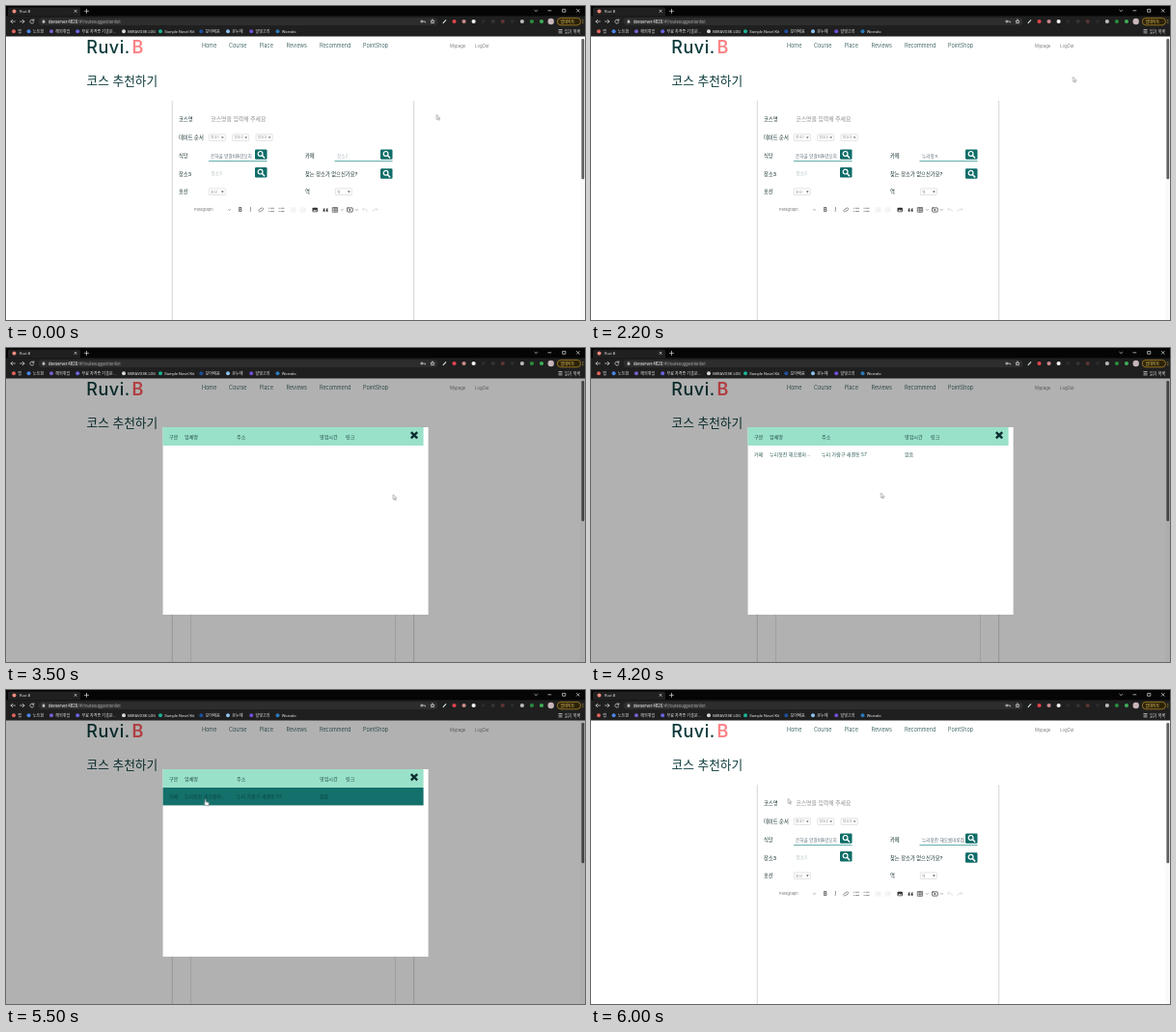
Animation, 600 px wide and 325 px high, one loop 6500 ms. Source, as an HTML page:

```html
<!DOCTYPE html>
<html lang="ko">
<head>
<meta charset="utf-8">
<title>코스 추천하기</title>
<style>
  html, body { margin: 0; width: 100%; height: 100%; overflow: hidden; background: #fff; }
  svg { display: block; width: 100%; height: 100%; }
  text { font-family: Inter, 'Noto Sans CJK KR', 'Noto Sans CJK', 'Noto Sans CJK JP', sans-serif; white-space: pre; }
  .chrome text { font-family: Roboto, 'Noto Sans CJK KR', 'Noto Sans CJK', 'Noto Sans CJK JP', sans-serif; }
  .line { fill: none; stroke-linecap: round; stroke-linejoin: round; }
  .ink { fill: #0d3b3c; }

  .cursor, .arrow, .hand, .modal, .result, .hover, .rowText, .accent, .frame {
    animation: 6500ms infinite step-end;
  }
  .cursor { animation-name: travel; animation-timing-function: ease-in-out; }
  .arrow { animation-name: arrow; }
  .hand { animation-name: hand; }
  .modal { animation-name: modal; }
  .result { animation-name: result; }
  .hover { animation-name: hover; }
  .rowText { fill: #2d5f58; animation-name: rowText; }
  .accent { fill: #fb8488; animation-name: accent; }
  .frame { stroke: #fff; animation-name: frame; }

  @keyframes travel {
    0% { transform: translate(446.2px, 112.4px); }
    12.3% { transform: translate(463.2px, 114.8px); }
    27.7%, 33.8% { transform: translate(499.5px, 73.4px); }
    44.6%, 53.8% { transform: translate(401.2px, 151.8px); }
    64.6%, 66.1% { transform: translate(300.5px, 150.1px); }
    75.4%, 86.1% { transform: translate(206.2px, 112.6px); }
    87.7%, 100% { transform: translate(204.3px, 112.4px); }
  }
  @keyframes arrow {
    0%, 53.8%, 86.1% { opacity: 1; }
    44%, 73.8% { opacity: 0; }
  }
  @keyframes hand {
    0%, 53.8%, 86.1% { opacity: 0; }
    44%, 73.8% { opacity: 1; }
  }
  @keyframes modal { 0%, 86.1% { opacity: 0; } 53.8% { opacity: 1; } }
  @keyframes result { 0% { opacity: 0; } 55.3% { opacity: 1; } }
  @keyframes hover { 0%, 86.1% { opacity: 0; } 73.8% { opacity: 1; } }
  @keyframes rowText { 0%, 86.1% { fill: #2d5f58; } 73.8% { fill: #0a4644; } }
  @keyframes accent { 0%, 86.1% { fill: #fb8488; } 53.8% { fill: #ff5a5e; } }
  @keyframes frame { 0%, 86.1% { stroke: #fff; } 53.8% { stroke: #dcdce4; } }
</style>
</head>
<body>
<svg viewBox="0 0 600 325" preserveAspectRatio="none">
  <defs>
    <g id="search">
      <rect width="12.5" height="10.4" rx="1.2" fill="#0f6d68"/>
      <circle cx="5.6" cy="4.5" r="2.4" fill="none" stroke="#fff" stroke-width="1.2"/>
      <path d="M7.5 6.4L9.7 8.6" stroke="#fff" stroke-width="1.5" stroke-linecap="round"/>
    </g>
    <g id="select">
      <rect x=".3" y=".3" width="17" height="6.6" rx=".6" fill="#fff" stroke="#c6c6c6" stroke-width=".5"/>
      <path d="M13 2.9h2.6L14.3 4.6z" fill="#444"/>
    </g>
    <path id="chevron" class="line" d="M-1-.5L0 .5L1-.5" stroke="#555" stroke-width=".5"/>
    <g id="bullets" class="line" stroke="#555" stroke-width=".6">
      <path d="M-.6-1.7H2.6M-.6 1.5H2.6M-2.6-1.7h.5M-2.6 1.5h.5"/>
    </g>
    <g id="indent" class="line" stroke="#ddd" stroke-width=".5">
      <path d="M-2.5-2h5M0-.6h2.5M0 .7h2.5M-2.5 2h5M-2.4-.7l1.2.8l-1.2.8"/>
    </g>
    <path id="undo" class="line" d="M-2.4-.6H.8Q2.4-.4 2.3 1.5M-1-2L-2.4-.6L-1 .8" stroke="#d2d2d2" stroke-width=".6"/>
  </defs>

  <rect width="600" height="325" fill="#fff"/>

  <!-- page header -->
  <text class="ink" x="83.3" y="48.6" font-size="18" font-weight="500" letter-spacing=".5">Ruvi.</text>
  <text class="accent" x="130.6" y="48.6" font-size="18" font-weight="600">B</text>
  <g class="ink" font-size="5.5" font-weight="300">
    <text x="203" y="43.4">Home</text>
    <text x="231" y="43.4">Course</text>
    <text x="262.8" y="43.4">Place</text>
    <text x="290.6" y="43.4">Reviews</text>
    <text x="325" y="43.4">Recommend</text>
    <text x="370" y="43.4">PointShop</text>
  </g>
  <g fill="#555" font-size="4.3" font-weight="300">
    <text x="460" y="43.2">Mypage</text>
    <text x="486" y="43.2">LogOut</text>
  </g>
  <text class="ink" x="83.6" y="82.3" font-size="12.7">코스 추천하기</text>

  <!-- form -->
  <path d="M172.3 98V325M422.6 98V325" stroke="#dcdce0" stroke-width="1.2"/>
  <path class="frame" d="M191.6 219V325M403.4 219V325" stroke-width=".8"/>
  <g fill="#173132" font-size="5.3" font-weight="500">
    <text x="179" y="119.2">코스명</text>
    <text x="179" y="138">데이트 순서</text>
    <text x="179" y="156.8">식당</text>
    <text x="179" y="175.6">장소3</text>
    <text x="179" y="194.2">호선</text>
    <text x="310" y="156.8">카페</text>
    <text x="310" y="175.6">찾는 장소가 없으신가요?</text>
    <text x="310" y="194.2">역</text>
  </g>
  <text x="212.3" y="119.3" font-size="5.85" font-weight="300" fill="#8c8c8c">코스명을 입력해 주세요</text>
  <use href="#select" x="210" y="132.5"/>
  <use href="#select" x="234.4" y="132.5"/>
  <use href="#select" x="258.8" y="132.5"/>
  <use href="#select" x="210" y="188.6"/>
  <use href="#select" x="341" y="188.6"/>
  <g fill="#888" font-size="3.8">
    <text x="212" y="137.4">장소1</text>
    <text x="236.4" y="137.4">장소2</text>
    <text x="260.8" y="137.4">장소3</text>
    <text x="212" y="193.5">호선</text>
    <text x="343" y="193.5">역</text>
  </g>
  <path d="M210 160.5H270.5M340.5 160.5H400.5" stroke="#3f9b97" stroke-width=".8"/>
  <g font-size="4.65">
    <text x="212" y="156.6" fill="#5f6f7a">은하골 양갈비&amp;양꼬치</text>
    <text x="212.5" y="175.3" fill="#b4c0c6">장소3</text>
    <text id="cafe" x="343" y="156.6"></text>
  </g>
  <use href="#search" x="258" y="148.4"/>
  <use href="#search" x="258" y="167.1"/>
  <use href="#search" x="388" y="148.4"/>
  <use href="#search" x="388" y="168.3"/>

  <!-- editor toolbar -->
  <g fill="#444">
    <text x="195" y="212.3" font-size="4" fill="#777">Paragraph</text>
    <text x="241" y="213" font-size="5.6" font-weight="700">B</text>
    <text x="252.5" y="213" font-size="5.6" font-style="italic">I</text>
    <use href="#chevron" x="231.5" y="211"/>
    <g class="line" stroke="#555" stroke-width=".6">
      <path d="M263.7 210.2l1-1q1.3-.8 1.9.3q.3.8-.4 1.4l-1.6 1.4M264.6 211.8l-1 1q-1.3.7-1.8-.4q-.3-.8.4-1.4l1.6-1.4"/>
    </g>
    <use href="#bullets" x="275" y="211"/>
    <use href="#bullets" x="285.5" y="211"/>
    <use href="#indent" x="297.5" y="211"/>
    <use href="#indent" x="307.7" y="211"/>
    <rect x="317.5" y="208.7" width="5.4" height="4.5" rx=".7" fill="#333"/>
    <path d="M318 212.6l1.5-1.8l1.1 1l.8-.7l1 1.5z" fill="#fff"/>
    <path d="M328.6 211.2q0-2 1.8-2.2v1q-.6.3-.6.8h.7v2h-1.9zM331.7 211.2q0-2 1.8-2.2v1q-.6.3-.6.8h.7v2h-1.9z" fill="#333"/>
    <path class="line" d="M338.6 208.7h5v4.6h-5zM338.6 209h5M338.6 211.2h5M340.3 209v4.3M342 209v4.3" stroke="#444" stroke-width=".6"/>
    <use href="#chevron" x="348.3" y="211"/>
    <rect class="line" x="353.6" y="208.9" width="5.6" height="4.2" rx=".5" stroke="#444" stroke-width=".8"/>
    <path d="M355.6 209.8l2 1.2l-2 1.2z" fill="#333"/>
    <use href="#chevron" x="363.5" y="211"/>
    <use href="#undo" x="372" y="211"/>
    <use href="#undo" transform="translate(382.5 211) scale(-1 1)"/>
  </g>

  <!-- scrollbar -->
  <rect x="595.2" y="31" width="4.8" height="294" fill="#fafafa"/>
  <rect x="596.4" y="34" width="2.8" height="145.3" rx="1.2" fill="#606062"/>

  <!-- result dialog -->
  <g class="modal">
    <rect y="31" width="600" height="294" fill="#000" opacity=".305"/>
    <rect x="162.6" y="82" width="275" height="194" fill="#fff"/>
    <rect x="162.6" y="82" width="270" height="19" fill="#9ae1ca"/>
    <path d="M419.8 87.2l6.4 6.2M426.2 87.2l-6.4 6.2" stroke="#0b2e30" stroke-width="2.4"/>
    <g fill="#234f4a" font-size="5.1">
      <text x="169" y="93.6">구분</text>
      <text x="185" y="93.6">업체명</text>
      <text x="239" y="93.6">주소</text>
      <text x="325" y="93.6">영업시간</text>
      <text x="352" y="93.6">링크</text>
    </g>
    <g class="result">
      <rect class="hover" x="162.6" y="101" width="270" height="18.4" fill="#14706a"/>
      <g class="rowText" font-size="5">
        <text x="169" y="112.4">카페</text>
        <text x="185" y="112.4">누리찻잔 해오름마...</text>
        <text x="239" y="112.4">누리 가람구 새결동 57</text>
        <text x="325" y="112.4">없음</text>
      </g>
    </g>
  </g>

  <!-- browser -->
  <g class="chrome">
    <rect width="600" height="21.4" fill="#050505"/>
    <path d="M2 10.6V3.2q0-1.6 1.6-1.6H75.4q1.6 0 1.6 1.6V10.6z" fill="#202020"/>
    <rect y="10.4" width="600" height="21.1" fill="#1f1f1f"/>
    <rect x="33.5" y="12.2" width="414" height="7.8" rx="3.9" fill="#2d2d2d"/>
    <circle cx="8.5" cy="5.4" r="2" fill="#f08a7c"/>
    <text x="14" y="6.9" font-size="4" fill="#ddd">Ruvi.B</text>
    <g class="line" stroke="#ddd" stroke-width=".7">
      <path d="M71 4.2l2.2 2.2M73.2 4.2l-2.2 2.2M81.5 5.3h4M83.5 3.3v4"/>
      <path d="M547.8 4.3l1.4 1.3l1.4-1.3M561.8 4.8h3M577 3.4h2.8v2.8H577zM591.4 3.4l2.8 2.8M594.2 3.4l-2.8 2.8"/>
      <path d="M9.4 16H5M6.8 14.2L5 16l1.8 1.8M14.6 16H19M17.2 14.2L19 16l-1.8 1.8"/>
      <path d="M28.6 15a2 2 0 1 0 .2 1.8M28.9 13.7v1.4h-1.4"/>
      <path d="M431.8 16h2.6v1M442 14l.6 1.4l1.5.1l-1.1 1l.3 1.5l-1.3-.8l-1.3.8l.3-1.5l-1.1-1l1.5-.1z"/>
    </g>
    <rect x="37.7" y="15.3" width="2.6" height="2.3" fill="#ccc"/>
    <path class="line" d="M38.3 15.2v-.6q.7-1 1.4 0v.6" stroke="#ccc" stroke-width=".5"/>
    <circle cx="430.8" cy="16" r="1" fill="none" stroke="#ddd" stroke-width=".8"/>
    <text x="44" y="17.5" font-size="4.45" fill="#f2f2f2">devserver:4820<tspan fill="#a5a5a5">/#/routesuggestionlist</tspan></text>
    <path d="M452.8 17.8l3.2-3.4" stroke="#d6ead6" stroke-width="1.1"/>
    <g id="extensions"></g>
    <circle cx="564.7" cy="16" r="3.2" fill="#c9b6ba"/>
    <rect x="571.3" y="12.4" width="24.2" height="7.4" rx="3.7" fill="#2b2208" stroke="#d9a72c" stroke-width=".6"/>
    <text x="574.5" y="17.5" font-size="4" fill="#f5d06a">업데이트</text>
    <path d="M597.8 14v.8M597.8 15.7v.8M597.8 17.4v.8" stroke="#f0c14b" stroke-width=".8"/>
    <g id="bookmarks" font-size="4.1" fill="#e4e4e4"></g>
    <path d="M572.5 24.5h4M572.5 26.2h4M572.5 27.9h4" stroke="#ddd" stroke-width=".7"/>
    <text x="579" y="27.7" font-size="4.2" fill="#e4e4e4">읽기 목록</text>
  </g>

  <g class="cursor">
    <path class="arrow" d="M0 0V5L1.2 4L2 5.8L2.8 5.4L2.1 3.7H3.6z" fill="#fff" stroke="#444" stroke-width=".4"/>
    <path class="hand" d="M-.2 .8q.6-1 1.2 0V3l2.6.7q.7.2.6 1L3.6 7H.6L-1.5 4.4q.1-.9 1.3 0z" fill="#fff" stroke="#333" stroke-width=".4"/>
  </g>
</svg>
<script>
  const LOOP = 6500;
  const byId = id => document.getElementById(id);

  function add(parent, tag, attributes, content = '') {
    const node = document.createElementNS(parent.namespaceURI, tag);
    for (const key in attributes) node.setAttribute(key, attributes[key]);
    node.textContent = content;
    parent.append(node);
  }

  const bookmarks = [
    [8, '#e0635a', '앱'], [23.6, '#4a86e8', '노트함'], [47, '#7a5fd0', '해외취업'],
    [74.2, '#6c63e0', '무료 자격증 기출문...'], [122, '#d8d8d8', 'MIRAVOSK.LOG'],
    [160, '#18b394', 'Sample Novel Kit'], [202.3, '#1f4e9c', '모아배움'],
    [230, '#8fc1f0', '온누재'], [254.2, '#6f4fd8', '달빛고리'], [281.5, '#2a78b8', 'Worvalo']
  ];
  for (const [x, fill, label] of bookmarks) {
    add(byId('bookmarks'), 'circle', { cx: x, cy: 26.2, r: 2, fill });
    add(byId('bookmarks'), 'text', { x: x + 4.3, y: 27.7 }, label);
  }

  const extensions = ['#e0444c', '#c98a8c', '#f2f2f2', '#2a2a2a', '#333', '#5c3434', '#2a2a2a', '#b8bcb8', '#2c8a3e', '#3fae5a'];
  extensions.forEach((fill, i) =>
    add(byId('extensions'), 'circle', { cx: 464.5 + i * 10.05, cy: 16, r: 2.1, fill }));

  // Start time of each state of the cafe field
  const typing = [
    [0, ''], [1000, 'ㄴ'], [1100, '누'], [1300, '눌'], [1400, '누리'], [1600, '누맃'],
    [1700, '누리차'], [1900, '누리찻'], [2000, '누리찻ㅈ'], [2300, '누리찻자'],
    [2400, '누리찻잔'], [5600, '누리찻잔 해오름마루점']
  ];
  const cafe = byId('cafe');

  function draw() {
    const time = performance.now() % LOOP;
    const value = typing.filter(([start]) => start <= time).pop()[1];
    const shown = value || '장소2';
    if (cafe.textContent !== shown) {
      cafe.textContent = shown;
      cafe.setAttribute('fill', value ? '#5f6f7a' : '#b4c0c6');
    }
    requestAnimationFrame(draw);
  }
  draw();
</script>
</body>
</html>
```
